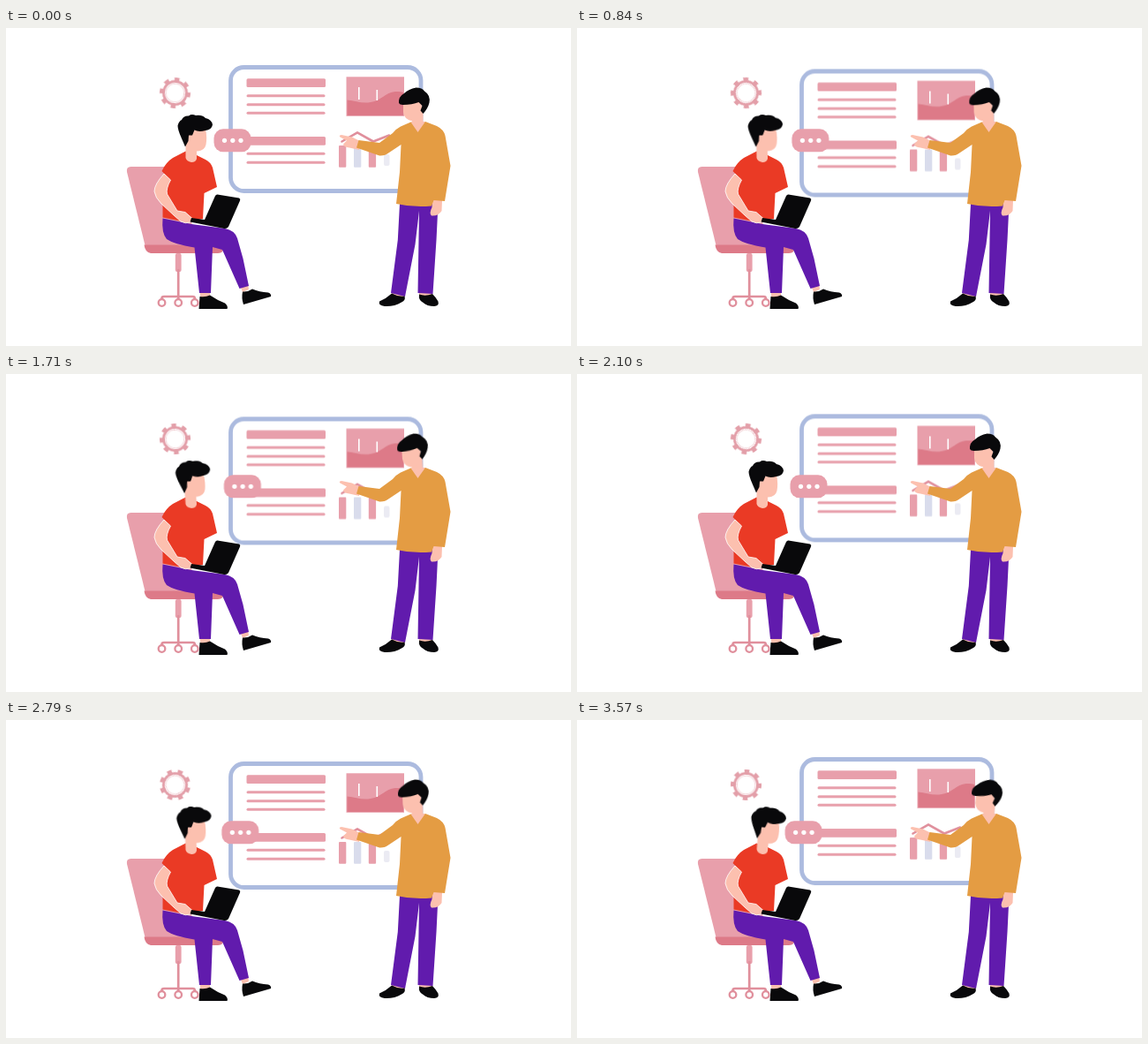
Recreate the animation shown at these times as an HTML page. Size 640x360 px, loop 3600 ms.

```html
<!DOCTYPE html>
<html lang="en">
<head>
<meta charset="utf-8">
<title>Presentation</title>
<style>
  html, body { margin: 0; width: 100%; height: 100%; overflow: hidden; background: #fff; }
  svg { display: block; width: 100vw; height: 100vh; }

  .pink { fill: #e89fab; }
  .rose { fill: #dd7a88; }
  .pale { fill: #d9dcec; }
  .faint { fill: #ebebf3; }
  .white { fill: #fff; }
  .skin { fill: #fcc0af; }
  .ink { fill: #09090b; }
  .red { fill: #ea3a25; }
  .gold { fill: #e49c43; }
  .violet { fill: #611bad; }
  .line { fill: none; stroke: #e08f9c; stroke-linecap: round; stroke-linejoin: round; }
  .edge { stroke: #fff; stroke-width: .8; stroke-linejoin: round; }

  .board, .bubble { animation: drop 600ms cubic-bezier(.37, 0, .63, 1) infinite alternate; }
  .bubble { animation-name: slide; }
  .head { animation: nod 3600ms cubic-bezier(.37, 0, .63, 1) infinite; }
  .gear { stroke: #e39fa9; transform-origin: 191.5px 73.5px; animation: spin 3600ms linear infinite; }
  .sitter { transform-origin: 210px 148px; }
  .speaker { transform-origin: 464px 110px; }

  @keyframes drop { to { transform: translateY(6.8px); } }
  @keyframes slide { to { transform: translateX(12px); } }
  @keyframes spin { from { transform: rotate(8deg); } to { transform: rotate(548deg); } }
  @keyframes nod {
    0% { transform: rotate(0deg); }
    16.6667%, 50%, 83.3333% { transform: rotate(-4.5deg); }
    33.3333%, 66.6667%, 100% { transform: rotate(4.5deg); }
  }
</style>
</head>
<body>
<svg viewBox="0 0 640 360">
  <g class="gear line">
    <circle cx="191.5" cy="73.5" r="13" stroke-width="3"/>
    <circle cx="191.5" cy="73.5" r="10.4" stroke-width=".7" opacity=".6"/>
    <circle cx="191.5" cy="73.5" r="15.5" stroke-width="4" stroke-linecap="butt"
      pathLength="80" stroke-dasharray="4.6 5.4" stroke-dashoffset="2.3"/>
  </g>

  <g class="board">
    <rect x="254.5" y="44.5" width="215.5" height="140" rx="15" fill="#fff" stroke="#acbbdf" stroke-width="4.8"/>
    <g class="pink">
      <rect x="272.5" y="57.3" width="89.5" height="9.8" rx="1.5"/>
      <rect x="272.5" y="75.3" width="89" height="3" rx="1.5"/>
      <rect x="272.5" y="85.3" width="89" height="3" rx="1.5"/>
      <rect x="272.5" y="94.8" width="89" height="3" rx="1.5"/>
      <rect x="272.5" y="123" width="89.5" height="9.8" rx="1.5"/>
      <rect x="272.5" y="140.8" width="89" height="3" rx="1.5"/>
      <rect x="272.5" y="150.8" width="89" height="3" rx="1.5"/>
      <rect x="385.5" y="55.3" width="65.5" height="44.5"/>
    </g>
    <path class="rose" d="M386.5 81.5C396 82 403 86 413 84C426 82 429 73 441 72Q447 71.5 450 73V99H386.5Z"/>
    <rect class="white" x="399" y="67" width="1.6" height="14"/>
    <rect class="white" x="419.5" y="70" width="1.6" height="12"/>
    <rect class="pink" x="377" y="133" width="8.3" height="24.8" rx="1"/>
    <rect class="pale" x="394" y="133" width="8.3" height="24.8" rx="1"/>
    <rect class="pink" x="410.8" y="133" width="8.3" height="24.8" rx="1"/>
    <rect class="faint" x="428" y="143" width="6.5" height="13" rx="2"/>
    <path class="line" d="M380.5 128.5L398 118.3L416 128.5L434 121.5" stroke-width="2.6"/>
  </g>

  <g class="bubble">
    <rect class="pink" x="235.5" y="114.3" width="42" height="26" rx="10.5"/>
    <g class="white">
      <circle cx="247.5" cy="127.3" r="2.6"/>
      <circle cx="256.8" cy="127.3" r="2.6"/>
      <circle cx="266" cy="127.3" r="2.6"/>
    </g>
  </g>

  <!-- chair -->
  <path class="pink" d="M141.5 157H182L206 200L216 248H158L137 163Q136 157 141.5 157Z"/>
  <path class="rose" d="M156.5 245.5H247.5Q247 255 240 255H164Q157.5 254 156.5 245.5Z"/>
  <rect class="pink" x="191.8" y="255" width="6.8" height="21" rx="2"/>
  <path class="line" d="M195.2 274V307M176.5 308V306Q176.5 304 179 304H211.5Q213.8 304 213.8 306V308" stroke-width="2.7"/>
  <g class="line" stroke-width="2.3" style="fill:#fff">
    <circle cx="176.5" cy="311" r="3.8"/>
    <circle cx="195.2" cy="311" r="3.8"/>
    <circle cx="213.8" cy="311" r="3.8"/>
  </g>

  <!-- seated person -->
  <path class="skin" d="M220 298H231V305H220ZM265 291L274 289L275 296L268 299Z"/>
  <path class="violet" d="M177.5 215.5L210 222L248 227Q259 229 262 238L268.5 261L275 292L264.5 295L245 251L234 248L232 300H219L213.5 248.5Q190 244.500 182 239Q176 232 177.5 215.5Z"/>
  <path class="ink" d="M219.5 304Q226 305 231 302.5Q239 308 248 311.5Q252 315 250.5 318H218.500ZM268 298.5Q274 299 279 295.5Q287 299 297 299.500Q301 301 300 304L269 313Q266.500 306 268 298.500Z"/>
  <path class="red" d="M203.5 139.5L189 147Q181 152 176.5 162L186 172L177.5 190V214.5L200 219L223 216L224.5 187L239 180L234 158Q232 152 226 149L216 144Z"/>
  <path class="skin edge" d="M179 165Q168 177 168 185Q169 192 176 199L190 212L198 219Q203 222 209 220L211 215.5L203 208.5L194 207L182.5 188Q181 182 186.5 172Z"/>
  <path class="ink" d="M239.5 188.5L264 192.5Q266 193.5 265 195.5L252 225Q250.5 227.5 247 227L208.5 219.5L210 215L225 217L237 190Q238 188.3 239.5 188.5Z"/>
  <g class="head sitter">
    <path class="skin" d="M203.5 128H216V148Q215 152 210 152Q204.5 151 203.5 147Z"/>
    <path class="skin" d="M204 117L226 114Q228 124 226.5 132Q225 139 217 139.5Q208 139 204 134Z"/>
    <path class="ink" d="M203 134.5L198.500 124Q194.500 115 194.5 110.500Q196 105 199 104Q201 99 207 99.500Q210 97 215 99Q222 98 226 102Q233 103.500 234 109.500Q233 115 226 116Q218 118 213.500 115.500L211 121.500L207 121.500L206.500 128Z"/>
  </g>

  <!-- standing person -->
  <path class="skin" d="M401 128L392 123.5L380 121Q376.5 121.5 378.5 123.5L386 127.5L382 131.5Q382.5 135 389 135.5L400 138Z"/>
  <path class="skin" d="M437 297H452V304H437ZM468 297H483V304H468Z"/>
  <path class="violet" d="M446 199H489.5L487.5 240L483.5 301L466.5 300L468 207L463.5 245L452 304L436 300L443.8 240Z"/>
  <path class="skin" d="M483 195L494 195L493.5 207Q490 213 482 212.5Q479 210 482.5 203Z"/>
  <path class="ink" d="M437 300.5Q444 304.5 451.5 303.5Q453 308.500 448 310.5Q440 315.5 429 315Q421.5 314 423 309.5Q431 306 437 300.5ZM468 301.5Q475 304 483 301Q487 305 489.5 309.5Q491 314.5 485 315Q477 315 472 310.5Q467 308 468 301.5Z"/>
  <path class="gold" d="M458.5 106.5L447 111.5Q442 114 438 119L423 130L399.5 127L397 135.5L423 144.5Q429 145 434 141L447.5 132L446 163L442 199Q462 203.5 482 201.5L484.5 195L497 196L503.5 156L497.5 122Q496 115 488 111L475 106Z"/>
  <path class="skin" d="M458.5 106.5L466.5 118L475 106Z"/>
  <g class="head speaker">
    <path class="skin" d="M459 94H472.5V108Q467 112 460 107Z"/>
    <path class="skin" d="M450 83L470 81L472 96Q467 105 459 105Q451 103 450 95Z"/>
    <path class="ink" d="M445 85Q444.500 77.500 451 74Q456 69 464.500 67.500Q471.500 67.500 474 71.500Q481 76 479.500 84.500Q478 91 472.500 97L469.500 93.500L471.500 88L467.500 84Q460 87 449.500 87Q446 87 445 85Z"/>
  </g>
</svg>
</body>
</html>
```
